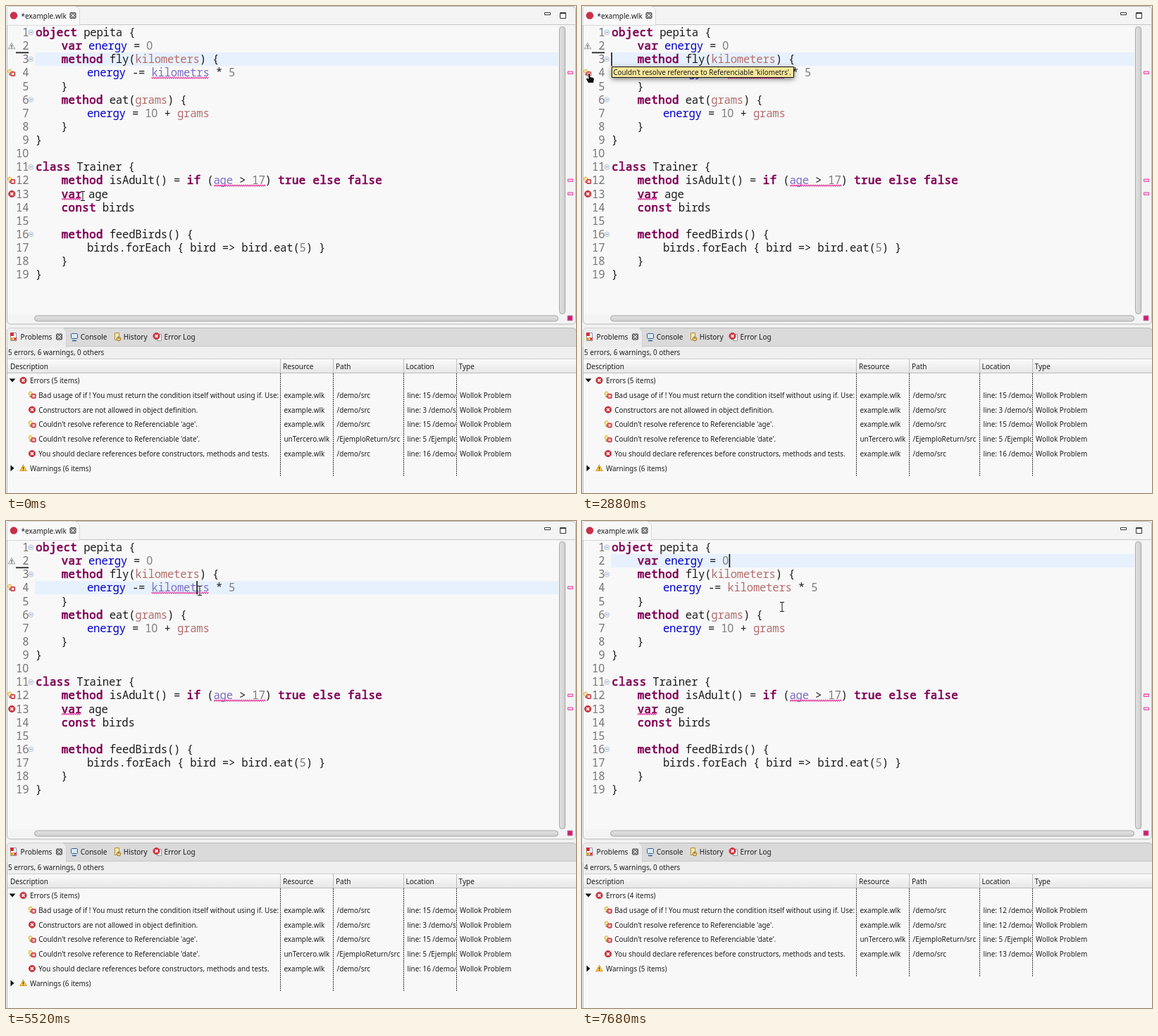
Animation, 809 px wide and 692 px high, one loop 8000 ms. Source, as an HTML page with a canvas:

```html
<!DOCTYPE html>
<html lang="en">
<head>
<meta charset="utf-8">
<title>Quick fix in the editor</title>
<style>
html, body { margin: 0; width: 100%; height: 100%; overflow: hidden; background: #f2f2f2; }
canvas { display: block; }
</style>
</head>
<body>
<canvas id="stage" width="809" height="692"></canvas>
<script>
const ctx = document.getElementById('stage').getContext('2d');
const LOOP = 8000, STEP = 120, PITCH = 19.13;
const SIZE = 15.7, ADVANCE = 9.14, BOLD_EXTRA = 0.73;
const SANS = '"Noto Sans", sans-serif';
const MONO = '"Noto Sans Mono", "DejaVu Sans Mono", monospace';
const INK = '#1c1c1c', PINK = '#e545a3', RED = '#d32f3a';
const COLORS = { energy: '#0000c8', kilometers: '#b56d6d', grams: '#b56d6d' };
const KEYWORD = '\\b(?:object|class|method|var|const|if|true|else|false)\\b';
const KEYWORD_RUN = `${KEYWORD}(?: ${KEYWORD})*`;
const TOKENS = new RegExp(`${KEYWORD_RUN}|~?\\w+|\\s+|[^\\w\\s~]+`, 'g');
const IS_KEYWORD = new RegExp(`^${KEYWORD_RUN}$`);
const HINT = "Couldn't resolve reference to Referenciable 'kilometrs'.";

// a leading ~ marks an unresolved name
const codeLines = target => [
  'object pepita {',
  '    var energy = 0',
  '    method fly(kilometers) {',
  `        energy -= ${target} * 5`,
  '    }',
  '    method eat(grams) {',
  '        energy = 10 + grams',
  '    }',
  '}',
  '',
  'class Trainer {',
  '    method isAdult() = if (~age > 17) true else false',
  '    var age',
  '    const birds',
  '',
  '    method feedBirds() {',
  '        birds.forEach { bird => bird.eat(5) }',
  '    }',
  '}'
];

// time, x, y of the pointer
const PATH = [
  [0, 109, 270], [240, 17, 124], [360, 64, 220], [480, 64, 220],
  [720, 120, 339], [840, 156, 300], [1080, 122, 190], [1320, 82, 138],
  [1440, 75, 127], [1680, 45, 216], [1920, 19, 165], [2160, 18, 117],
  [2400, 11, 103], [4200, 11, 103], [4320, 94, 98], [4560, 212, 96],
  [4800, 275, 86], [4920, 283, 88], [5040, 283, 88], [5160, 283, 98],
  [5400, 275, 99], [5640, 275, 99], [5880, 284, 122], [8000, 284, 122]
];

const lineTop = n => 66 + (n - 3) * PITCH;
const between = (t, a, b) => t >= a && t < b;

function pointerAt(t) {
  const i = Math.max(1, PATH.findIndex(p => p[0] > t));
  const [t0, x0, y0] = PATH[i - 1], [t1, x1, y1] = PATH[i];
  const k = (t - t0) / (t1 - t0);
  return [x0 + (x1 - x0) * k, y0 + (y1 - y0) * k];
}

function rect(x, y, w, h, fill, stroke, r = 0) {
  ctx.beginPath();
  ctx.roundRect(x, y, w, h, r);
  if (fill) { ctx.fillStyle = fill; ctx.fill(); }
  if (stroke) { ctx.strokeStyle = stroke; ctx.lineWidth = 1; ctx.stroke(); }
}

function shadowRect(x, y, w, h, fill) {
  ctx.save();
  ctx.shadowColor = 'rgba(0,0,0,.5)';
  ctx.shadowBlur = 7;
  ctx.shadowOffsetY = 2;
  rect(x, y, w, h, fill);
  ctx.restore();
}

function shape(points, fill, stroke, width = 1) {
  ctx.beginPath();
  points.forEach(([x, y], i) => i ? ctx.lineTo(x, y) : ctx.moveTo(x, y));
  ctx.closePath();
  if (stroke) { ctx.strokeStyle = stroke; ctx.lineWidth = width; ctx.stroke(); }
  if (fill) { ctx.fillStyle = fill; ctx.fill(); }
}

function line(x0, y0, x1, y1, color, width = 1) {
  ctx.beginPath();
  ctx.moveTo(x0, y0);
  ctx.lineTo(x1, y1);
  ctx.strokeStyle = color;
  ctx.lineWidth = width;
  ctx.stroke();
}

function disc(x, y, r, fill, stroke) {
  ctx.beginPath();
  ctx.arc(x, y, r, 0, Math.PI * 2);
  if (fill) { ctx.fillStyle = fill; ctx.fill(); }
  if (stroke) { ctx.strokeStyle = stroke; ctx.lineWidth = 1; ctx.stroke(); }
}

function cross(x, y, r, color, width) {
  line(x - r, y - r, x + r, y + r, color, width);
  line(x - r, y + r, x + r, y - r, color, width);
}

function label(str, x, middle, size = 9.89) {
  ctx.font = `${size}px ${SANS}`;
  ctx.fillStyle = INK;
  ctx.fillText(str, x, middle + 4);
}

function gradient(x0, y0, x1, y1, a, b) {
  const g = ctx.createLinearGradient(x0, y0, x1, y1);
  g.addColorStop(0, a);
  g.addColorStop(1, b);
  return g;
}

// Bold is the regular face with thickened outlines; zeros are plain.
function mono(str, x, y, color, bold) {
  ctx.fillStyle = ctx.strokeStyle = color;
  ctx.lineWidth = BOLD_EXTRA;
  for (const c of str) {
    ctx.font = `${SIZE}px ${c === '0' ? SANS : MONO}`;
    ctx.fillText(c, x + (bold ? BOLD_EXTRA / 2 : 0), y);
    if (bold) ctx.strokeText(c, x + BOLD_EXTRA / 2, y);
    x += ADVANCE + (bold ? BOLD_EXTRA : 0);
  }
  return x;
}

function squiggle(x0, x1, n) {
  const y = lineTop(n) + 17;
  ctx.beginPath();
  for (let x = x0, i = 0; x <= x1; x += 1.5, i++) ctx.lineTo(x, y + (i % 2 ? 0.9 : -0.9));
  ctx.strokeStyle = PINK;
  ctx.lineWidth = 1.2;
  ctx.stroke();
}

function errorIcon(x, y) {
  disc(x, y, 4.6, RED, '#b8424a');
  cross(x, y, 1.9, '#fff', 1.5);
}

function fixIcon(x, y) {
  disc(x - 2.3, y - 2.2, 2.5, '#fff0a0', '#d9a23c');
  rect(x - 3.5, y + 1, 2.5, 2.5, '#b98b4a');
  rect(x - 0.8, y - 1.5, 6, 6, '#e0525a', '#c23a43', 1);
  cross(x + 2.2, y + 1.5, 1.5, '#fff', 1.2);
}

function warnIcon(x, y, fill, edge) {
  shape([[x, y - 4], [x + 4.2, y + 3.6], [x - 4.2, y + 3.6]], fill, edge, 1.4);
  line(x, y - 1.8, x, y + 1.2, '#333', 1.2);
  line(x, y + 2, x, y + 3, '#333', 1.2);
}

function closeIcon(x, y) {
  rect(x - 4, y - 4, 8, 8, null, '#555', 1);
  cross(x, y, 3.4, '#333', 3.2);
  cross(x, y, 3, '#fafafa', 1.3);
}

function foldIcon(n) {
  const y = lineTop(n) + 9.7;
  disc(35.3, y, 3.4, '#eef3f8', '#b3c4d6');
  line(33.5, y, 37.1, y, '#7f98b4');
}

function drawEditor(s) {
  rect(0, 0, 809, 692, '#f2f2f2');
  rect(1.5, 0.5, 807, 451.5, '#f4f4f4', '#b9b9b9', 5);
  rect(2, 27, 783, 411, '#f8f8f8');
  line(1, 26.5, 808, 26.5, '#c6c6c6');

  const shift = s.saved ? -6 : 0;
  shape([[1.5, 27], [1.5, 4], [4, 0.5], [99 + shift, 0.5], [104.5 + shift, 6], [104.5 + shift, 27]], '#f9f9f9', '#b9b9b9');
  disc(11, 13.5, 5.2, '#c8304a');
  label(s.saved ? 'example.wlk' : '*example.wlk', 21.5, 13.5, 10.05);
  closeIcon(95 + shift, 13.5);
  rect(764.5, 9.5, 8, 3, '#fff', '#333');
  rect(786.5, 9.5, 8, 8, '#fff', '#333');
  line(786, 10.5, 795, 10.5, '#333');

  rect(41, lineTop(s.active), 743, PITCH, '#e7f1fd');
  if (s.changed) rect(14, lineTop(4), 19, PITCH, '#efdbe9');

  codeLines(s.target).forEach((text, i) => {
    const y = 43 + i * PITCH;
    let x = 41.8;
    const number = String(i + 1);
    mono(number, 32.3 - number.length * ADVANCE, y, '#767676');
    for (const raw of text.match(TOKENS) || []) {
      const word = raw.replace('~', '');
      const bold = IS_KEYWORD.test(word);
      const color = raw !== word ? '#7b6fc4' : bold ? '#7f0055'
        : /^\d/.test(word) ? '#7d7d7d' : COLORS[word] || INK;
      x = mono(word, x, y, color, bold);
    }
  });
  [1, 3, 6, 11, 16].forEach(foldIcon);

  if (s.marked) {
    squiggle(206.5, s.target.length > 10 ? 297 : 288, 4);
    fixIcon(7.5, 95);
  }
  squiggle(295, 369, 12);
  squiggle(79, 107, 13);
  fixIcon(7.5, 248);
  errorIcon(8.3, 267);
  if (!s.listed) warnIcon(8, 57, '#f1f1f1', '#8c8c8c');
  if (s.diff) line(14, 66.3, 32, 66.3, '#222', 1.8);

  // scroll bars and overview ruler
  rect(785, 27, 10, 411, '#f0f0f0');
  rect(785.5, 29.5, 8, 408, gradient(785, 0, 794, 0, '#e2e2e2', '#cfcfcf'), '#a8a8a8', 4);
  rect(40.5, 440, 743, 8, gradient(0, 440, 0, 448, '#e2e2e2', '#cfcfcf'), '#a8a8a8', 4);
  for (const y of [s.marked ? 95 : 248, 248, 267]) rect(797.5, y - 2, 7, 3.5, '#fbd0e8', PINK);
  rect(797, 440, 7, 7, '#d01c76', '#b8879f');

  if (s.caret !== null) rect(s.caret, lineTop(s.active), 1.6, PITCH, '#111');
}

function drawTabs() {
  rect(1.5, 457.5, 808, 240, '#dadada', '#b9b9b9', 5);
  rect(2, 483, 807, 19, '#efefef');
  line(1, 483.5, 809, 483.5, '#c8c8c8');
  shape([[1.5, 485], [1.5, 461], [4, 457.5], [81, 457.5], [85.5, 463], [85.5, 485]], '#ececec', '#b9b9b9');
  rect(2, 483, 83, 3, '#eeeeee');

  rect(6.5, 464.5, 8, 11, '#fff', '#8795a8');
  rect(6, 464, 5, 5, RED);
  rect(6, 471, 4, 4, '#d2a43a');
  cross(13, 473, 2, RED, 1.6);
  label('Problems', 20.6, 470, 10.05);
  closeIcon(75.5, 470);

  rect(92.5, 465.5, 9, 7, '#d9e9fa', '#345c91', 1);
  line(94, 475.5, 100, 475.5, '#345c91', 1.5);
  label('Console', 105.7, 470, 10.05);

  rect(154.5, 464.5, 6, 10, '#f5e6ae', '#b58d35');
  disc(160, 473, 2.8, '#f8d86b', '#96712a');
  line(160, 471, 160, 473, '#634', 1);
  label('History', 166.8, 470, 10.05);

  rect(214.5, 466.5, 6, 9, '#fff', '#8795a8');
  errorIcon(213.5, 469);
  label('Error Log', 224.6, 470, 10.05);
}

function drawProblems(s) {
  drawTabs();
  const count = s.listed ? 4 : 5, warnings = count + 1;
  const rowY = i => 532 + i * 20.8;
  const [first, last] = s.marked ? [15, 16] : [12, 13];
  label(`${count} errors, ${warnings} warnings, 0 others`, 3, 492);

  rect(2, 502, 807, 190, '#f8f8f8');
  rect(2, 501.5, 807, 20, gradient(0, 502, 0, 521, '#fbfbfb', '#e7e7e7'));
  line(2, 501.5, 809, 501.5, '#cfcfcf');
  line(2, 521.5, 809, 521.5, '#bdbdbd');
  [['Description', 6], ['Resource', 393], ['Path', 468], ['Location', 567.5], ['Type', 642.5]]
    .forEach(([name, x]) => label(name, x, 511.5, 10.05));

  ctx.setLineDash([2, 1]);
  for (const x of [389.5, 464.5, 564.5, 639.5]) line(x, 522, x, rowY(count + 1) + 11, '#333');
  ctx.setLineDash([]);
  for (const x of [389.5, 464.5, 564.5, 639.5]) line(x, 502, x, 521, '#bdbdbd');

  shape([[4.5, 529.5], [13.5, 529.5], [9, 534.5]], '#111');
  errorIcon(24.5, 532);
  label(`Errors (${count} items)`, 34, 532);

  const demo = ['example.wlk', '/demo/src'];
  const rows = [
    [fixIcon, 'Bad usage of if ! You must return the condition itself without using if. Use:', ...demo, first],
    [errorIcon, 'Constructors are not allowed in object definition.', ...demo, 3],
    [fixIcon, "Couldn't resolve reference to Referenciable 'age'.", ...demo, first],
    [fixIcon, "Couldn't resolve reference to Referenciable 'date'.", 'unTercero.wlk', '/EjemploReturn/src', 5],
    [errorIcon, 'You should declare references before constructors, methods and tests.', ...demo, last]
  ];
  if (s.listed) rows.splice(1, 1);
  rows.forEach(([icon, message, file, path, at], i) => {
    const y = rowY(i + 1);
    icon(37, y);
    label(message, 46.2, y);
    label(file, 394.5, y);
    label(path, 469.5, y);
    ctx.save();
    ctx.beginPath();
    ctx.rect(565, y - 10, 73, 20);
    ctx.clip();
    label(`line: ${at} ${path}`, 569.5, y);
    ctx.restore();
    label('Wollok Problem', 644, y);
  });

  const y = rowY(count + 1);
  shape([[6.5, y - 4.5], [11.5, y], [6.5, y + 4.5]], '#111');
  warnIcon(24.5, y, '#fbc94a', '#c98a20');
  label(`Warnings (${warnings} items)`, 34, y);
}

function drawTooltip() {
  shadowRect(42, 86, 259, 16, '#f8e79b');
  rect(42.5, 86.5, 258, 15, null, '#111');
  label(HINT, 44.2, 93.5);
}

function drawPopup() {
  shadowRect(40, 64.5, 273, 30, '#ededed');
  rect(40.5, 64.5, 272, 29.5, null, '#c4c4c4');
  rect(42, 66, 257, 14, '#f8e79b');
  label(HINT, 43.6, 72.7);
  rect(301.5, 67, 8, 12, '#e2e2e2', '#a8a8a8', 3);
  rect(43.5, 82, 255, 8, gradient(0, 82, 0, 90, '#dedede', '#c9c9c9'), '#a8a8a8', 4);
}

function drawPointer(t) {
  const [x, y] = pointerAt(t);
  if (between(t, 2280, 4320)) {
    const hand = [[-2, -7], [0, -7], [0.5, -2], [5, -1], [6, 1], [5, 6], [-2, 6], [-5, 1], [-4, -0.5], [-1.5, 1]];
    shape(hand.map(([a, b]) => [x + a, y + b]), '#111', '#fff', 1.4);
  } else if (between(t, 4680, 5160)) {
    const arrow = [[0, 0], [0, 11], [2.6, 8.6], [4.4, 12.6], [6.2, 11.8], [4.4, 8], [8, 8]];
    shape(arrow.map(([a, b]) => [x + a, y + b]), '#111', '#fff', 1.4);
  } else {
    for (const [color, w] of [['#fff', 2.6], ['#222', 1.1]]) {
      line(x, y - 6, x, y + 6, color, w);
      line(x - 3, y - 6.5, x + 3, y - 6.5, color, w);
      line(x - 3, y + 6.5, x + 3, y + 6.5, color, w);
    }
  }
}

function caretAt(t) {
  if (t < 5520) {
    const lit = t >= 600 && Math.floor((t - 480) / 600) % 2 === 0;
    return lit ? 41.3 : null;
  }
  if (t < 6120) return 270.3;
  if (t < 6480 || between(t, 7080, 7440)) return null;
  return t < 7680 ? 279.6 : 208.6;
}

function draw(now) {
  const t = Math.floor(now % LOOP / STEP) * STEP;
  const marked = t < 7200;
  const word = t < 6480 ? 'kilometrs' : 'kilometers';
  const state = {
    marked,
    saved: t >= 7080,
    listed: t >= 7680,
    diff: t < 7440,
    changed: between(t, 6480, 7440),
    active: t < 5520 ? 3 : t < 7440 ? 4 : t < 7680 ? 3 : 2,
    target: (marked ? '~' : '') + word,
    caret: caretAt(t)
  };
  drawEditor(state);
  drawProblems(state);
  if (between(t, 2880, 4680)) drawTooltip();
  if (between(t, 4680, 5160)) drawPopup();
  drawPointer(t);
}

const start = performance.now();
function tick() {
  draw(performance.now() - start);
  requestAnimationFrame(tick);
}
tick();
</script>
</body>
</html>
```
